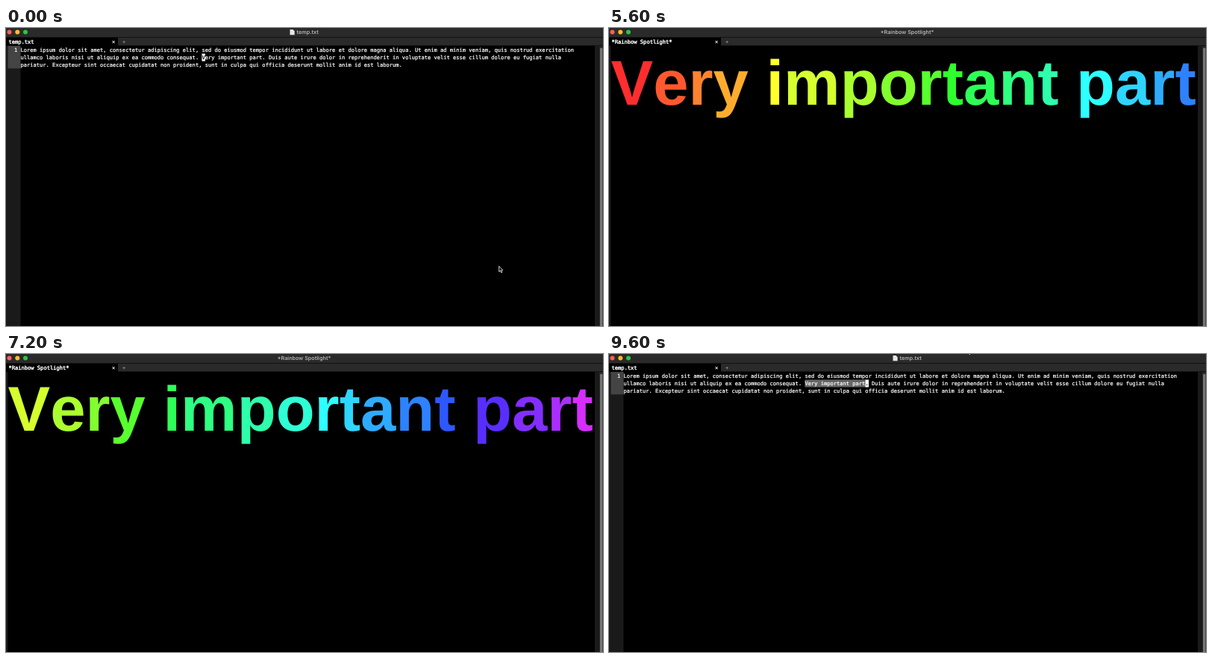
Write an HTML page that moves like this. It is 800x400 px and loops after 9.7 s.

```html
<!DOCTYPE html>
<html lang="en">
<head>
<meta charset="utf-8">
<title>Rainbow Spotlight</title>
<style>
  html, body { margin: 0; width: 100%; height: 100%; overflow: hidden; background: #000; }
  svg { display: block; width: 800px; height: 400px; }
  text { white-space: pre; text-rendering: geometricPrecision; }
  .mono { font: 7.08px "DejaVu Sans Mono", monospace; fill: #fff; stroke: #fff; stroke-width: .22px; }
  .title { font: 600 7.2px Inter, sans-serif; fill: #b4b4b4; }
  .tab { stroke-width: .4px; }
  .dim { fill: #aaa; stroke: none; }
  .inverse { fill: #000; stroke: #000; }
  #big { font: bold 85px "Liberation Sans", sans-serif; font-kerning: none; }
</style>
</head>
<body>
<svg viewBox="0 0 800 400">
  <rect width="800" height="400"/>
  <rect width="800" height="23.5" fill="#2a2a2a"/>
  <rect y="12" width="800" height="1" fill="#121212"/>
  <rect y="13" width="150" height="11"/>
  <circle cx="4.5" cy="5.5" r="3" fill="#ff5f57"/>
  <circle cx="15.3" cy="5.5" r="3" fill="#febc2e"/>
  <circle cx="26" cy="5.5" r="3" fill="#28c840"/>
  <text class="mono" x="142" y="21">×</text>
  <text class="mono dim" x="156" y="21">+</text>
  <rect y="24" width="2.5" height="376" fill="#1a1a1a"/>
  <rect x="789" y="24" width="6" height="376" fill="#1a1a1a"/>
  <rect x="795" y="24" width="5" height="376" fill="#262626"/>
  <rect x="796" y="26.5" width="3.4" height="380" rx="1.7" fill="#777"/>

  <g id="editor">
    <path d="M380.5 2h4l2.2 2.2v5h-6.2z" fill="#e6e6e6"/>
    <text class="title" x="389.5" y="8">temp.txt</text>
    <text class="mono tab" x="3.5" y="21">temp.txt</text>
    <rect y="24" width="19.5" height="376" fill="#1a1a1a"/>
    <rect x="2.5" y="24" width="17" height="30.3" fill="#444"/>
    <text class="mono" x="11" y="31.9">1</text>
    <rect id="region" y="34.5" height="10" fill="#666"/>
    <g id="lines" class="mono"></g>
    <g id="cursor">
      <rect y="34.5" width="4.6" height="10" fill="#fff"/>
      <text class="mono inverse" y="41.9"></text>
    </g>
  </g>

  <g id="spotlight">
    <text class="title" x="399.5" y="8" text-anchor="middle">*Rainbow Spotlight*</text>
    <text class="mono tab" x="3.5" y="21">*Rainbow Spotlight*</text>
    <text id="big" x="2.5" y="103"></text>
  </g>

  <path id="mouse" d="M0 0V7.4L1.7 5.9L2.9 8.7L4.1 8.2L2.9 5.4H5z" fill="#000" stroke="#fff" stroke-width=".8"/>
</svg>
<script>
const LOOP = 9700, STEP = 100;
const CELL = 4.262, LEFT = 19.5, START = 57;
const PHRASE = "Very important part";
const LINES = [
  "Lorem ipsum dolor sit amet, consectetur adipiscing elit, sed do eiusmod tempor incididunt ut labore et dolore magna aliqua. Ut enim ad minim veniam, quis nostrud exercitation",
  "ullamco laboris nisi ut aliquip ex ea commodo consequat. Very important part. Duis aute irure dolor in reprehenderit in voluptate velit esse cillum dolore eu fugiat nulla",
  "pariatur. Excepteur sint occaecat cupidatat non proident, sunt in culpa qui officia deserunt mollit anim id est laborum."
];
const $ = id => document.getElementById(id);
const add = (parent, tag, text) => {
  const el = document.createElementNS("http://www.w3.org/2000/svg", tag);
  el.textContent = text;
  return parent.appendChild(el);
};
const show = (el, on) => el.setAttribute("visibility", on ? "visible" : "hidden");
const within = (t, a, b) => t >= a && t < b;
const column = n => LEFT + CELL * n;

LINES.forEach((line, i) => {
  const el = add($("lines"), "text", line);
  el.setAttribute("x", LEFT);
  el.setAttribute("y", 31.9 + 10 * i);
});
const letters = [...PHRASE].map(c => add($("big"), "tspan", c));
const [block, glyph] = $("cursor").children;

// Characters selected so far, one word at a time
const selected = t => t < 3900 ? 0 : t < 4100 ? 4 : t < 4300 ? 14 : 19;

function drawEditor(t) {
  const count = selected(t), x = column(START + count);
  $("region").setAttribute("x", column(START));
  $("region").setAttribute("width", CELL * count);
  block.setAttribute("x", x);
  glyph.setAttribute("x", x);
  glyph.textContent = LINES[1][START + count];
  const blinkOff = within(t, 3000, 3500) || within(t, 4800, 5300);
  $("cursor").setAttribute("display", blinkOff ? "none" : "inline");
}

function drawMouse(t) {
  const p = Math.min(1, Math.max(0, (t - 8700) / 700));
  const ease = p * p * (3 - 2 * p);
  const y = t >= 9500 ? -8.2 : 319.7 * (1 - ease);
  $("mouse").setAttribute("transform", `translate(${660.7 - 180.7 * ease} ${y})`);
  show($("mouse"), t < 2500 || t >= 8600);
}

function draw(now) {
  const t = Math.floor(now % LOOP / STEP) * STEP;
  const lit = within(t, 5600, 8200);
  show($("editor"), !lit);
  show($("spotlight"), lit);
  if (lit) {
    const base = (t - 5600) * 0.045;
    letters.forEach((el, i) => el.setAttribute("fill", `hsl(${base + 12 * i}, 100%, 59%)`));
  } else {
    drawEditor(t);
  }
  drawMouse(t);
}

const begin = performance.now();
function tick() {
  draw(performance.now() - begin);
  requestAnimationFrame(tick);
}
tick();
</script>
</body>
</html>
```
